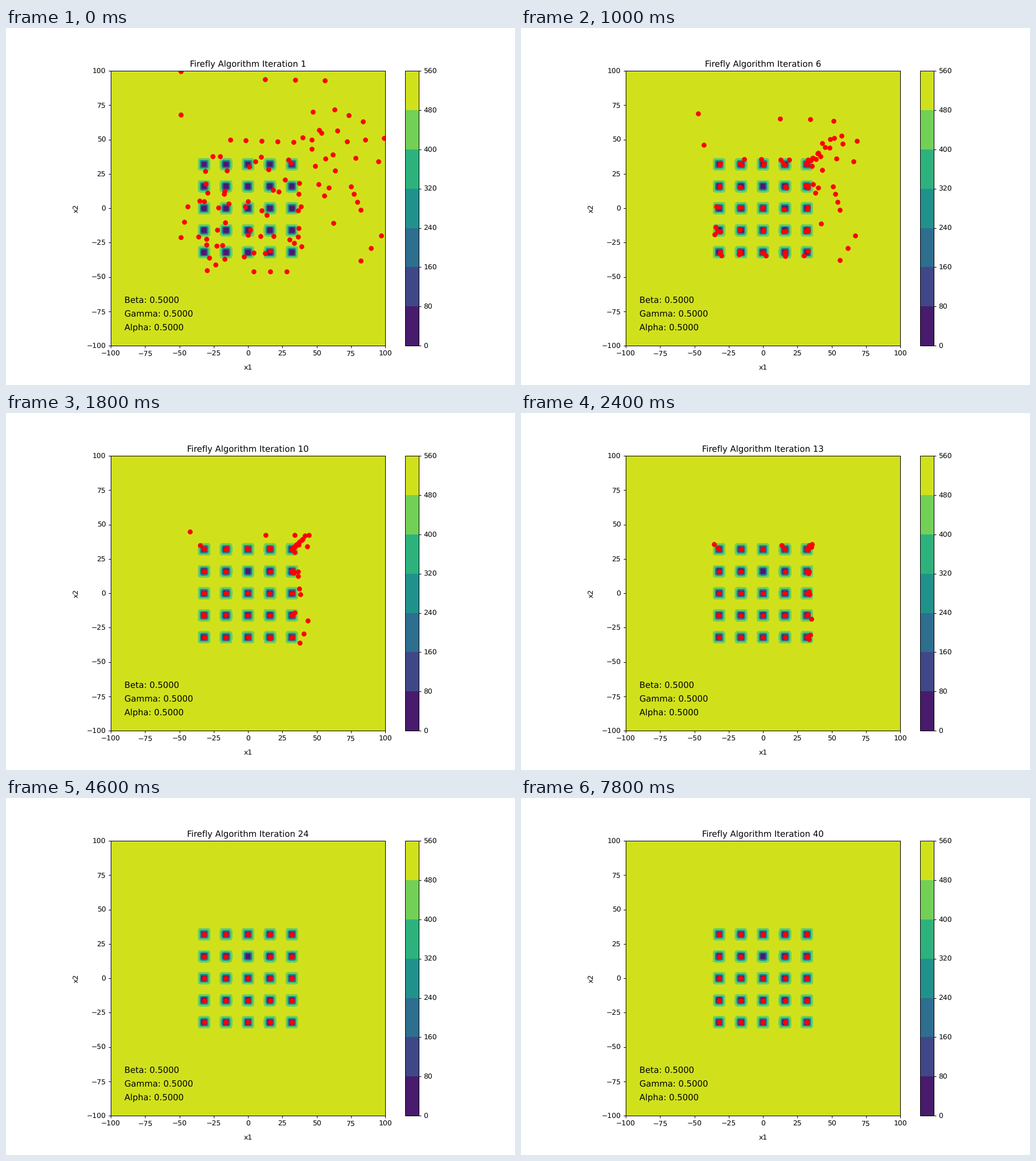
A matplotlib script that plays this animation: 894x626 px, repeating every 8000 ms.

```python
import matplotlib.pyplot as plt
import numpy as np
from matplotlib.animation import FuncAnimation

ITERATIONS = 40
BETA = GAMMA = ALPHA = 0.5

# Centres of the 25 foxholes, row by row
axis = np.arange(-32, 33, 16)
holes = np.array([(x, y) for y in axis for x in axis], float)


def foxholes(x, y):
    total = sum(1 / (j + (x - a) ** 6 + (y - b) ** 6)
                for j, (a, b) in enumerate(holes, 1))
    return 1 / (0.002 + total)


def start_swarm(seed=7):
    """Loose strings of fireflies outside, random ones near the holes."""
    rng = np.random.default_rng(seed)
    strings = [
        np.linspace(*ends, n) for n, *ends in (
            (2, (-49, 99.5), (-49, 68)),
            (3, (12.5, 94), (56, 93)),
            (3, (63, 72), (84, 63)),
            (5, (-13, 50), (33, 48)),
            (3, (99, 51), (72, 48.7)),
            (3, (62, 39), (95, 34)),
            (4, (75, 16), (82, -1)),
            (3, (97, -20), (82, -38)),
            (3, (4, -46), (28, -46)),
            (3, (-44, 1.5), (-49, -21)),
            (3, (-17, -37), (-30, -45)),
        )
    ]
    # Two around every hole but the one that stays empty
    taken = holes[(holes != (0, 16)).any(axis=1)]
    near = np.repeat(taken, 2, axis=0)
    near += rng.uniform(-7, 7, near.shape)
    right = np.column_stack([rng.uniform(36, 66, 16),
                             rng.triangular(-20, 36, 90, 16)])
    return np.vstack([*strings, near, right])


def fly(swarm):
    """Positions per iteration: each firefly drifts to its nearest hole."""
    gaps = np.linalg.norm(swarm[:, None] - holes, axis=2)
    goal = holes[gaps.argmin(axis=1)]
    speed = 0.65 * gaps.min(axis=1) ** 0.53
    path = [swarm]
    for _ in range(ITERATIONS - 1):
        off = goal - path[-1]
        dist = np.linalg.norm(off, axis=1)
        # The longer component dominates the heading
        pull = np.sign(off) * np.abs(off) ** 2.5
        norm = np.linalg.norm(pull, axis=1)
        unit = pull / np.where(norm > 0, norm, 1)[:, None]
        step = np.minimum(speed, 0.32 * dist)
        path.append(path[-1] + unit * step[:, None])
    return path


path = fly(start_swarm())

plt.rcParams.update({"font.family": "DejaVu Sans", "text.hinting": "none"})
fig, ax = plt.subplots(figsize=(10, 7.0023), dpi=89.4)

grid = np.linspace(-100, 100, 400)
X, Y = np.meshgrid(grid, grid)
field = ax.contourf(X, Y, foxholes(X, Y), levels=np.arange(0, 561, 80),
                    cmap="viridis", vmin=0, vmax=560)
fig.colorbar(field, ax=ax)

ax.set_aspect("equal")
ax.set(xlim=(-100, 100), ylim=(-100, 100))
ax.set_xlabel("x1", labelpad=10)
ax.set_ylabel("x2", labelpad=10)
title = ax.set_title("Firefly Algorithm Iteration 1")
dots = ax.scatter(*path[0].T, color="red")

params = (("Beta", BETA), ("Gamma", GAMMA), ("Alpha", ALPHA))
for row, (name, value) in enumerate(params):
    ax.text(-90, -70 - 10 * row, f"{name}: {value:.4f}",
            fontsize=12, va="bottom")


def update(i):
    dots.set_offsets(path[i])
    title.set_text(f"Firefly Algorithm Iteration {i + 1}")
    return dots, title


anim = FuncAnimation(fig, update, frames=ITERATIONS, interval=200,
                     repeat=True, repeat_delay=0)
plt.show()
```
